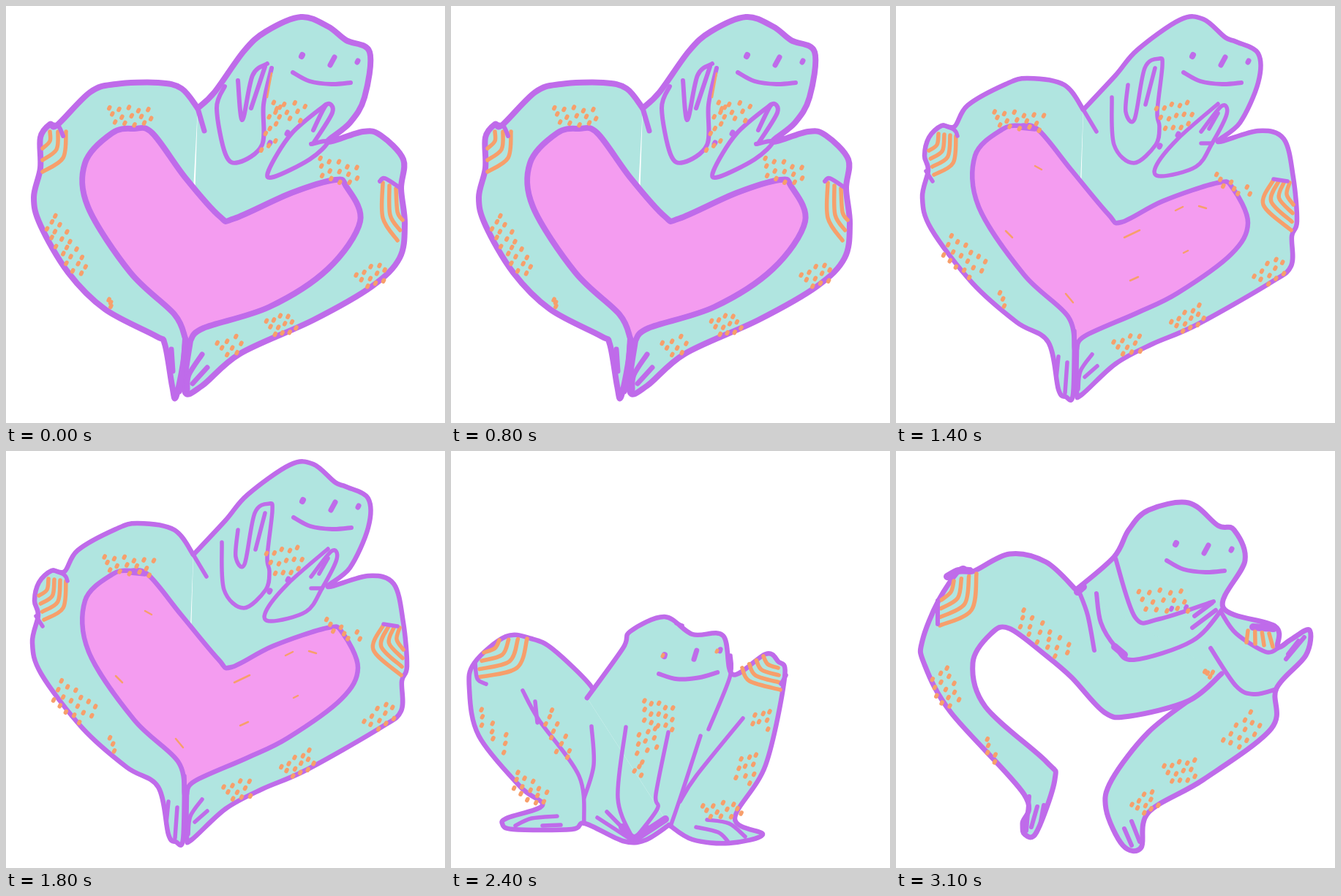
Recreate the animation shown at these times as an HTML page with a canvas. Size 600x571 px, loop 3300 ms.

```html
<!DOCTYPE html>
<html lang="en">
<head>
<meta charset="utf-8">
<title>Frog heart</title>
<style>
html, body { margin: 0; width: 100%; height: 100%; overflow: hidden; background: #fff; }
canvas { display: block; width: 100%; height: 100%; }
</style>
</head>
<body>
<canvas id="stage" width="600" height="571"></canvas>
<script>
const MINT = '#b0e5e0', PURPLE = '#bf6bea', PINK = '#f49cf0', ORANGE = '#f79f6b';
const ctx = document.getElementById('stage').getContext('2d');
ctx.lineCap = ctx.lineJoin = 'round';
let pen = 7;

const parse = text => text.split(' ').map(pair => pair.split(',').map(Number));
const mix = (a, b, t) => a + (b - a) * t;

// Catmull-Rom spline through the points.
function curve(points, color, width, fill) {
  const at = i => points[Math.max(0, Math.min(points.length - 1, i))];
  ctx.beginPath();
  ctx.moveTo(...points[0]);
  for (let i = 0; i < points.length - 1; i++) {
    const [a, b, c, d] = [at(i - 1), at(i), at(i + 1), at(i + 2)];
    const leave = b.map((v, k) => v + (c[k] - a[k]) / 6);
    const arrive = c.map((v, k) => v - (d[k] - b[k]) / 6);
    ctx.bezierCurveTo(...leave, ...arrive, ...c);
  }
  if (fill) { ctx.fillStyle = fill; ctx.fill(); }
  ctx.strokeStyle = color;
  ctx.lineWidth = width;
  ctx.stroke();
}

const body = text => curve(parse(text), PURPLE, pen, MINT);
const heart = text => curve(parse(text), PURPLE, pen, PINK);
const line = text => curve(parse(text), PURPLE, pen - 1);
const bold = text => curve(parse(text), PURPLE, 10);
const fleck = text => curve(parse(text), ORANGE, 2.5);
const dot = (x, y, color, width) => curve([[x, y], [x - 1, y + 2]], color, width);

// Evenly spaced stripes from an outer curve to an inner one.
function stripes(count, outer, inner) {
  const from = parse(outer), to = parse(inner);
  for (let i = 0; i < count; i++) {
    const t = i / (count - 1);
    curve(from.map((p, k) => p.map((v, axis) => mix(v, to[k][axis], t))), ORANGE, 5.5);
  }
}

// Three staggered rows of dots, centred on x, y and turned by some degrees.
function spots(x, y, length, breadth, degrees, count) {
  const turn = degrees * Math.PI / 180, cos = Math.cos(turn), sin = Math.sin(turn);
  for (let i = 0; i < count; i++) {
    const along = ((i + 0.5) / count - 0.5) * length;
    const across = (i % 3 - 1) * breadth / 2.4 + 2 * Math.sin(i * 5);
    dot(x + along * cos - across * sin, y + along * sin + across * cos, ORANGE, 5.5);
  }
}

// The left eye sits at x, y.
function face(x, y, tilt = 0) {
  ctx.save();
  ctx.translate(x, y);
  ctx.rotate(tilt);
  curve(parse('-13,24 10,36 40,40 66,38'), PURPLE, 6);
  curve(parse('44,3 38,14'), PURPLE, 7);
  dot(0, 0, PURPLE, 8);
  dot(76, 8, PURPLE, 7);
  ctx.restore();
}

const poses = {
  hug() {
    pen = 8;
    body('262,140 240,113 208,105 150,107 115,118 70,163 60,162 47,180 47,222 38,262 47,300 85,365 135,415 205,452 217,463 227,520 232,536 242,490 245,455');
    body('252,458 244,527 268,520 320,476 420,430 500,384 538,345 545,298 540,250 543,210 512,177 488,172 440,186 470,160 490,125 497,63 465,47 440,28 403,15 355,35 325,62 285,118 262,140');
    heart('245,455 230,422 170,365 112,275 108,215 145,174 175,168 200,174 245,235 292,288 312,291 390,256 450,238 465,247 484,295 440,360 360,412 270,441 252,458');
    line('262,140 271,171');
    line('245,455 242,490 237,528');
    line('226,470 228,500');
    line('268,477 250,505 248,525');
    line('275,495 255,517');
    pen = 7;
    line('299,110 288,140 300,203 318,214 350,190 352,135 363,85');
    line('317,102 323,156 337,95 357,79');
    line('354,83 335,140');
    line('437,135 390,175 359,225 366,234 415,210 440,186 417,189');
    line('420,188 446,146 438,135 420,170');
    face(405, 67);
    dot(385, 173, PURPLE, 7);
    dot(361, 187, PURPLE, 7);
    fleck('363,92 357,125');
    spots(387, 143, 48, 24, 5, 10);
    spots(363, 167, 70, 16, 100, 9);
    stripes(3, '82,172 78,208 50,227', '60,172 60,185 50,195');
    line('62,162 72,165 78,178');
    stripes(3, '515,242 515,290 535,321', '533,250 535,282 542,293');
    line('511,240 518,236 540,250');
    spots(170, 150, 62, 24, 3, 14);
    spots(82, 328, 90, 24, 58, 20);
    spots(142, 406, 14, 4, 60, 3);
    spots(307, 466, 36, 24, -15, 8);
    spots(377, 436, 40, 26, -15, 12);
    spots(501, 369, 42, 26, -25, 11);
    spots(454, 226, 60, 28, 15, 14);
  },

  squeeze() {
    pen = 6.5;
    body('256,142 230,108 180,99 150,107 98,136 80,165 62,164 45,180 39,205 44,225 36,262 48,305 105,380 165,433 208,460 222,525 232,535 242,532 244,445');
    body('247,470 247,528 254,532 300,490 350,463 410,437 510,380 540,356 541,315 548,295 543,235 530,182 495,171 440,186 470,160 495,105 495,65 465,49 450,43 420,18 388,19 330,60 300,95 256,142');
    heart('244,470 235,425 175,368 113,275 108,205 145,169 170,164 195,170 240,225 290,285 308,296 365,267 440,242 460,249 481,297 458,340 385,393 330,420 258,452 247,470');
    line('256,142 274,172');
    line('41,226 50,240');
    line('244,445 246,528');
    line('222,480 219,510');
    line('234,488 231,530');
    line('268,477 252,500 249,525');
    line('275,493 258,508');
    line('295,125 298,190 325,215 355,190 360,165 357,145 364,82 360,72 340,85 326,155 314,145 317,108');
    line('354,85 341,135');
    line('440,134 385,182 355,220 362,233 410,220 432,188 452,148 445,137 417,172');
    line('432,188 417,188');
    line('440,147 428,168');
    face(406, 67);
    dot(361, 191, PURPLE, 7);
    dot(386, 175, PURPLE, 7);
    line('170,167 190,169');
    stripes(4, '82,178 78,215 52,231', '58,175 56,190 45,198');
    line('65,163 80,170 84,178');
    stripes(4, '516,238 502,272 540,307', '538,242 534,258 543,272');
    line('516,237 535,240');
    fleck('190,219 199,224');
    fleck('150,308 159,317');
    fleck('312,317 333,307');
    fleck('382,280 392,275');
    fleck('414,274 424,277');
    fleck('393,338 399,335');
    fleck('320,376 331,371');
    fleck('232,394 242,406');
    spots(382, 150, 50, 36, -10, 14);
    spots(168, 156, 72, 22, 5, 16);
    spots(92, 344, 66, 34, 38, 17);
    spots(145, 401, 28, 6, 60, 3);
    spots(318, 464, 40, 24, -15, 10);
    spots(401, 429, 48, 24, -30, 13);
    spots(513, 364, 46, 26, -40, 11);
    spots(460, 246, 60, 14, 25, 8);
  },

  unfold() {
    pen = 7;
    body('408,336 345,385 295,450 287,490 310,540 335,543 345,495 420,450 513,380 520,325 560,280 565,245 540,258 522,268 518,240 447,214 477,150 462,108 440,102 400,71 345,81 318,108 298,145 246,190');
    body('246,190 205,152 155,141 105,165 88,162 58,205 36,260 38,290 75,358 175,470 173,510 176,525 192,522 217,450 205,425 122,350 105,290 130,250 155,243 205,280 240,310 285,358 320,363 400,342 445,305');
    bold('248,193 256,186');
    line('250,192 262,225 271,273');
    line('300,147 327,228 360,230 434,206');
    line('274,195 280,235 300,268 325,286 405,260 447,215');
    bold('299,268 312,279');
    line('432,208 408,226');
    line('437,218 405,242');
    line('430,270 465,322 490,333 520,326');
    line('445,222 465,250 505,275 522,270');
    bold('488,241 516,243');
    line('558,255 533,285');
    line('550,260 536,278');
    line('182,473 178,520');
    line('193,487 185,515');
    line('202,485 197,512');
    line('312,517 322,540');
    line('322,507 333,535');
    face(383, 126);
    dot(377, 215, PURPLE, 6);
    dot(397, 213, PURPLE, 6);
    stripes(4, '110,168 103,218 60,239', '79,178 75,193 62,204');
    bold('70,172 85,164 101,164');
    line('57,205 57,237');
    stripes(4, '481,246 479,262', '510,250 515,268');
    spots(366, 204, 72, 30, 0, 15);
    spots(201, 251, 88, 26, 38, 17);
    spots(67, 324, 54, 30, 70, 14);
    spots(129, 410, 40, 12, 60, 5);
    spots(428, 305, 14, 10, 0, 4);
    spots(475, 384, 58, 28, -45, 13);
    spots(390, 438, 46, 28, -10, 13);
    spots(342, 482, 36, 24, -35, 10);
  },

  crouch() {
    pen = 7;
    body('345,402 305,470 300,505 310,530 335,538 365,536 372,515 440,465 495,390 552,350 560,330 552,318 508,338 490,275 465,262 415,270 439,212 424,170 402,164 362,133 337,131 307,143 280,170 260,207 215,252');
    body('215,252 160,206 130,198 95,203 45,255 30,300 45,372 115,460 125,480 98,510 115,522 185,505 195,475 130,350 145,305 200,350 260,412 310,415 390,375');
    line('215,252 235,320');
    line('262,210 285,300 325,308 400,280');
    line('236,262 265,345 310,360 405,315 415,285');
    line('400,335 440,390 495,390');
    line('420,290 475,342 508,338');
    line('552,330 530,348');
    line('145,490 118,507');
    line('160,500 130,515');
    line('322,510 332,535');
    line('335,502 348,532');
    face(345, 189);
    stripes(3, '108,204 92,258 45,272', '78,215 72,230 56,238');
    stripes(3, '455,266 475,300 502,302', '480,270 487,281 497,284');
    spots(318, 269, 66, 30, 0, 14);
    spots(182, 280, 70, 26, 50, 10);
    spots(60, 345, 54, 30, 70, 12);
    spots(112, 430, 34, 14, 55, 4);
    spots(460, 403, 54, 26, -45, 11);
    spots(372, 458, 40, 26, -15, 9);
    spots(344, 496, 26, 18, -20, 5);
  },

  sit() {
    pen = 6.5;
    body('186,338 192,323 140,272 110,257 75,254 32,290 25,325 38,390 95,460 125,485 78,502 70,510 85,518 165,518 183,510 235,534 265,533 298,512');
    body('298,512 330,532 380,537 426,525 388,503 430,430 456,310 447,288 430,278 385,306 372,253 330,251 292,227 245,247 235,270 186,338');
    line('382,280 381,310 352,381');
    line('98,328 120,368 175,445 182,510');
    line('115,343 118,372');
    line('192,377 195,430 182,475');
    line('239,378 228,475 248,530');
    line('297,385 280,470 282,490 252,530');
    line('341,390 315,470 300,514');
    line('399,366 335,445 313,480');
    line('200,502 243,530');
    line('213,494 246,528');
    bold('234,515 250,530 268,517');
    bold('293,504 255,529');
    line('145,500 110,503 88,513');
    line('150,512 125,513');
    line('335,515 365,522 378,534');
    line('350,505 380,510 402,528');
    line('308,236 316,239');
    face(292, 279, -0.2);
    dot(290, 279, ORANGE, 5);
    dot(364, 273, ORANGE, 5);
    stripes(4, '104,257 90,297 36,310', '66,259 60,270 45,276');
    line('33,290 36,312 48,319');
    stripes(4, '398,297 408,315 450,327', '427,281 433,292 447,297');
    line('458,307 451,319');
    spots(284, 360, 50, 32, 15, 15);
    spots(268, 396, 38, 28, 90, 9);
    spots(256, 434, 24, 14, 90, 4);
    spots(58, 382, 72, 18, 48, 9);
    spots(107, 463, 56, 26, 35, 14);
    spots(145, 388, 74, 20, 65, 11);
    spots(424, 366, 28, 24, 100, 7);
    spots(404, 433, 44, 24, 100, 10);
    spots(371, 491, 56, 20, -5, 12);
  }
};

function poseAt(ms) {
  if (ms < 2000) return Math.floor(ms / 200) % 2 ? 'squeeze' : 'hug';
  if (ms < 2200 || ms >= 3100) return 'unfold';
  return ms < 2400 || ms >= 2900 ? 'crouch' : 'sit';
}

function render() {
  ctx.clearRect(0, 0, 600, 571);
  poses[poseAt(performance.now() % 3300)]();
  requestAnimationFrame(render);
}
render();
</script>
</body>
</html>
```
